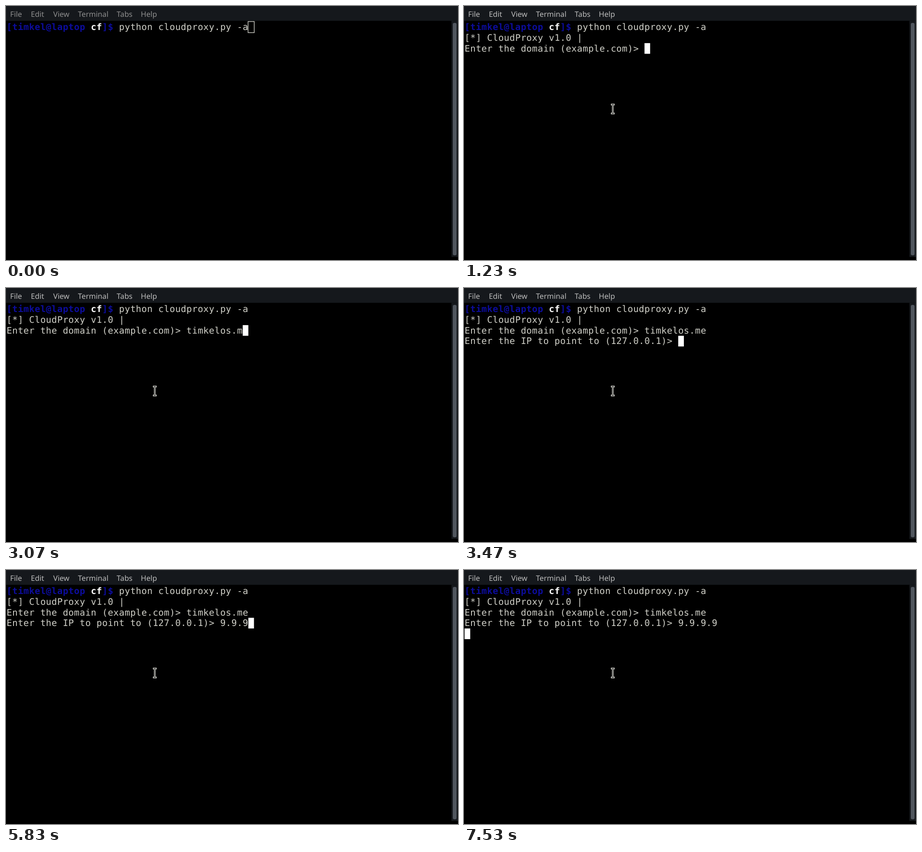
An HTML page that plays this animation: 960 px wide and 540 px high, repeating every 8 s.

```html
<!DOCTYPE html>
<html lang="en">
<head>
<meta charset="utf-8">
<title>Terminal session</title>
<style>
  html, body { margin: 0; width: 100%; height: 100%; overflow: hidden; background: #000; }
  svg { display: block; width: 960px; height: 540px; }
  text { white-space: pre; text-rendering: geometricPrecision; }
  #menu { font: 15.8px "Noto Sans", sans-serif; }
  #lines { font: 19.1px "DejaVu Sans Mono", monospace; letter-spacing: 0.441px; fill: #d0d0c8; }
  .user { fill: #0c0c9c; font-weight: bold; }
  .dir { fill: #fff; font-weight: bold; }
</style>
</head>
<body>
<svg viewBox="0 0 960 540">
  <rect width="960" height="540" fill="#000"/>
  <g fill="#15181c">
    <rect width="960" height="31.5"/>
    <rect x="946" y="31.5" width="14" height="502"/>
  </g>
  <rect x="949" y="36" width="8" height="494" rx="3" fill="#50565e"/>
  <g id="menu"></g>
  <g id="lines"></g>
  <rect id="block"/>
  <g id="pointer" fill="none" stroke-linecap="square">
    <path d="M-2.3-9.5H2.3M0-9V9M-2.3 9.5H2.3" stroke="#d8d8d2" stroke-width="3.4"/>
    <path d="M-2.3-9.5H2.3M0-9V9M-2.3 9.5H2.3" stroke="#101010" stroke-width="1"/>
  </g>
</svg>
<script>
const LOOP = 8000;
const CELL = { x: 1.3, y: 33.5, w: 11.94, h: 22.7 };
const FOCUS = 500, ENTER_COMMAND = 970, PROGRAM_START = 1230;
const ENTER_DOMAIN = 3300, ENTER_IP = 7430;

const COMMAND = "python cloudproxy.py -a";
const BANNER = "[*] CloudProxy v1.0 |";
const ASK_DOMAIN = "Enter the domain (example.com)> ";
const ASK_IP = "Enter the IP to point to (127.0.0.1)> ";
const DOMAIN = "timkelos.me";
const DOMAIN_KEYS = [1900, 2000, 2130, 2270, 2330, 2400, 2470, 2530, 2600, 2670, 3120];
// "<" is a backspace
const IP = "9.9.99<<9.9";
const IP_KEYS = [5300, 5430, 5570, 5700, 5830, 5930, 6400, 6500, 6700, 6800, 6930];

const $ = id => document.getElementById(id);
const clamp = v => Math.max(0, Math.min(1, v));

function addText(parent, x, y, content = "") {
  const el = document.createElementNS("http://www.w3.org/2000/svg", "text");
  el.setAttribute("x", x);
  el.setAttribute("y", y);
  el.innerHTML = content;
  parent.append(el);
  return el;
}

function setAttrs(el, attrs) {
  for (const key in attrs) el.setAttribute(key, attrs[key]);
}

[["File", 8.7], ["Edit", 52.8], ["View", 100.2], ["Terminal", 152.8], ["Tabs", 235], ["Help", 286.2]]
  .forEach(([label, x]) => addText($("menu"), x, 22.6, label));

const span = (name, s) => `<tspan class="${name}">${s}</tspan>`;
const baseline = row => CELL.y + row * CELL.h + 17.8;
const PROMPT_LENGTH = 20;
addText($("lines"), CELL.x, baseline(0),
  span("user", "[timkel@laptop ") + span("dir", "cf") + span("user", "]$ ") + COMMAND);
const rows = [1, 2, 3].map(row => addText($("lines"), CELL.x, baseline(row)));

function typed(keys, times, t) {
  let out = "";
  times.forEach((at, i) => {
    if (t >= at) out = keys[i] === "<" ? out.slice(0, -1) : out + keys[i];
  });
  return out;
}

function caretCell(t, domainLine, ipLine) {
  if (t < ENTER_COMMAND) return [PROMPT_LENGTH + COMMAND.length, 0];
  if (t < PROGRAM_START) return [0, 1];
  if (t < ENTER_DOMAIN) return [domainLine.length, 2];
  if (t < ENTER_IP) return [ipLine.length, 3];
  return [0, 4];
}

function drawCaret(t, col, row) {
  const x = CELL.x + col * CELL.w, y = CELL.y + row * CELL.h;
  setAttrs($("block"), t < FOCUS
    ? { x: x - 0.6, y: y - 0.5, width: 13.1, height: 23.6, fill: "none", stroke: "#dcdcd4", "stroke-width": 1.3 }
    : { x, y, width: CELL.w, height: CELL.h, fill: "#fff", stroke: "none" });
}

function drawPointer(t) {
  const left = 1 - clamp((t - 30) / 450);
  const far = left * left;
  const x = 316 + 640 * far, y = 219 + 217 * far;
  setAttrs($("pointer"), {
    transform: `translate(${x} ${y})`,
    visibility: t < 30 ? "hidden" : "visible"
  });
}

function draw(t) {
  const tone = 142 + 46 * clamp((t - 530) / 270);
  $("menu").setAttribute("fill", `rgb(${tone},${tone},${tone})`);

  const domainLine = ASK_DOMAIN + typed(DOMAIN, DOMAIN_KEYS, t);
  const ipLine = ASK_IP + typed(IP, IP_KEYS, t);
  rows[0].textContent = t >= PROGRAM_START ? BANNER : "";
  rows[1].textContent = t >= PROGRAM_START ? domainLine : "";
  rows[2].textContent = t >= ENTER_DOMAIN ? ipLine : "";

  drawCaret(t, ...caretCell(t, domainLine, ipLine));
  drawPointer(t);
}

const start = performance.now();
function tick() {
  draw((performance.now() - start) % LOOP);
  requestAnimationFrame(tick);
}
tick();
</script>
</body>
</html>
```
